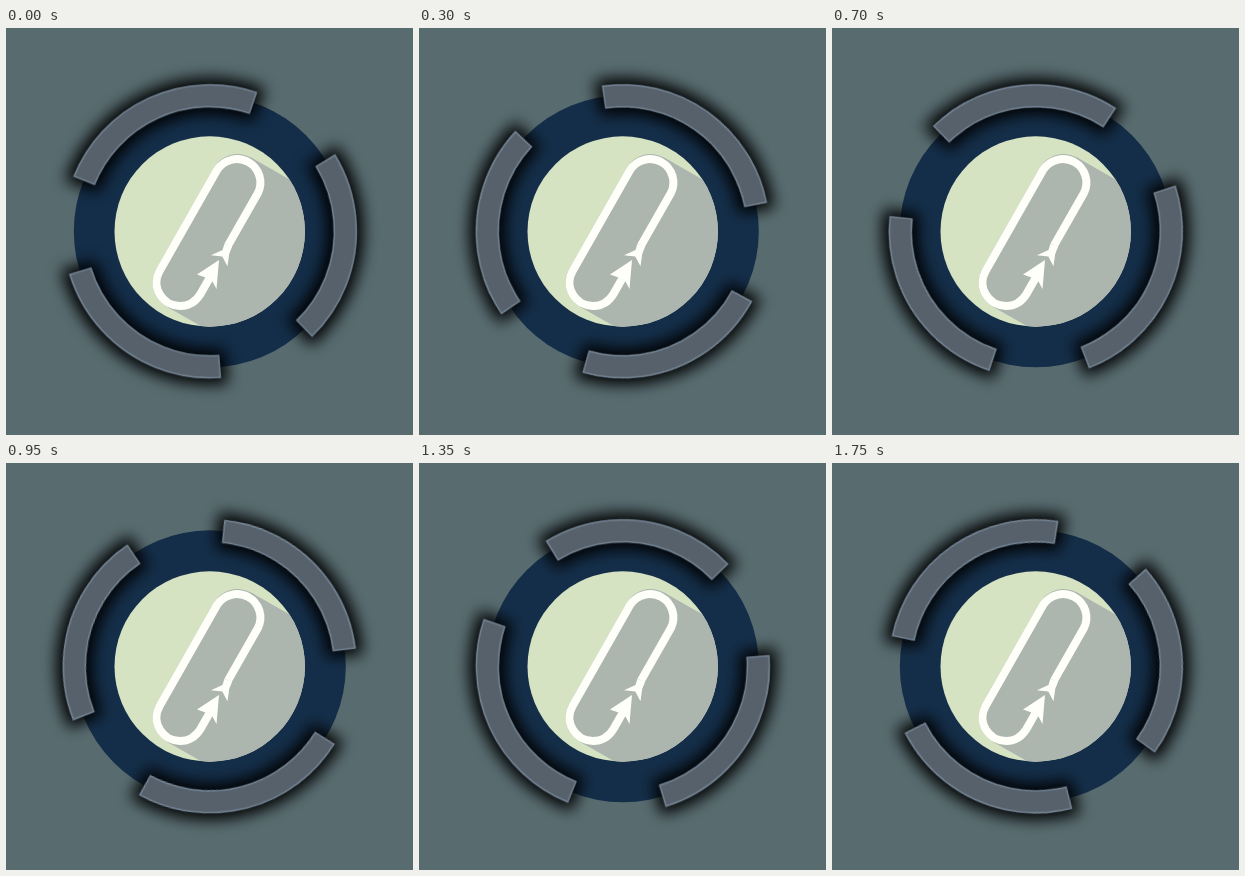
An HTML page that plays this animation: 407x407 px, repeating every 1.8 s.

```html
<!DOCTYPE html>
<html lang="en">
<head>
<meta charset="utf-8">
<title>Rotating ring</title>
<style>
  html, body { margin: 0; width: 100%; height: 100%; overflow: hidden; background: #586c70; }
  svg { display: block; width: 100%; height: 100%; }
  .ring { animation: turn 1.8s steps(36) infinite; }
  .ring circle { fill: none; }
  .shadow { stroke: #000; stroke-width: 36; stroke-dasharray: 92 34.6 82.6 34.6 82.5 33.7; }
  .edge { stroke: #748596; stroke-width: 23.4; stroke-dasharray: 87 39.6 77.6 39.6 77.5 38.7; }
  .face { stroke: #57616b; stroke-width: 20.4; stroke-dasharray: 85.8 40.8 76.4 40.8 76.3 39.9; }
  @keyframes turn { to { transform: rotate(360deg); } }
</style>
</head>
<body>
<svg viewBox="0 0 407 407">
  <defs>
    <filter id="blur" filterUnits="userSpaceOnUse" x="-204" y="-204" width="408" height="408" color-interpolation-filters="sRGB">
      <feGaussianBlur stdDeviation="7.5"/>
    </filter>
    <clipPath id="disc"><circle cx="203.7" cy="203.5" r="95.2"/></clipPath>
  </defs>

  <circle cx="203.8" cy="203.3" r="136" fill="#142e49"/>

  <!-- three arcs, angles in degrees through pathLength -->
  <g transform="translate(203.8 203.3)">
    <g class="ring">
      <g filter="url(#blur)">
        <circle class="shadow" r="135.5" pathLength="360" transform="rotate(199.3)"/>
      </g>
      <circle class="edge" r="135.5" pathLength="360" transform="rotate(201.8)"/>
      <circle class="face" r="135.5" pathLength="360" transform="rotate(202.4)"/>
    </g>
  </g>

  <g clip-path="url(#disc)">
    <rect x="100" y="100" width="210" height="210" fill="#d6e3c3"/>
    <!-- long shadow of the loop -->
    <path d="M231.5 153.5L174 254.5" stroke="#adb5af" stroke-width="55" stroke-linecap="round"/>
    <path d="M245.1 129.6l130 74.1l-84.7 148.8l-130 -74.1z" fill="#adb5af"/>
  </g>

  <path d="M222 217.6L251.9 165.1A23.5 23.5 0 0 0 211.1 141.9L153.6 242.9A23.5 23.5 0 0 0 174 278Q187 278 194.4 266.1L203 251"
        fill="none" stroke="#fffffa" stroke-width="8"/>
  <g fill="#fffffa">
    <path d="M218.4 215.8L216.5 222L205 227.2L216.3 228.6L221.5 238.2L223.2 226L226 219z"/>
    <path d="M213 232L191 246.5L199.5 249.5L206.5 253.5L210.5 261z"/>
  </g>
</svg>
</body>
</html>
```
